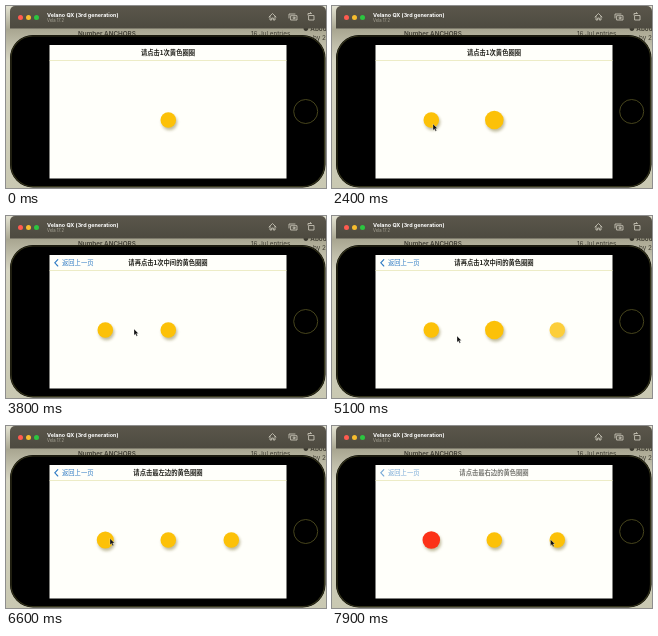
An HTML page for the animation above (8000 ms loop, 320 px wide and 182 px high).

```html
<!DOCTYPE html>
<html lang="zh">
<head>
<meta charset="utf-8">
<title>Tap the dots</title>
<style>
  html, body { margin: 0; width: 100%; height: 100%; overflow: hidden; background: #d0cec2; }
  svg { display: block; width: 100%; height: 100%; }
  text { font-family: "Noto Sans CJK SC", "Noto Sans CJK", "Noto Sans CJK JP", sans-serif; font-size: 6.3px; }
  .ui { font-family: Inter, Roboto, sans-serif; }
  .heading { font-weight: 700; fill: #20201a; text-anchor: middle; }
  .icon { fill: none; stroke: #d2cec0; stroke-width: .8; stroke-linejoin: round; stroke-linecap: round; }
</style>
</head>
<body>
<svg viewBox="0 0 320 182" preserveAspectRatio="none">
  <defs>
    <linearGradient id="bar" x2="0" y2="1">
      <stop stop-color="#5a564b"/><stop offset="1" stop-color="#4d4a40"/>
    </linearGradient>
    <linearGradient id="desk" x2="0" y2="1">
      <stop stop-color="#e4e3d2"/><stop offset=".13" stop-color="#a9a691"/>
      <stop offset=".3" stop-color="#d6d5c2"/><stop offset="1" stop-color="#c9c8b2"/>
    </linearGradient>
    <filter id="blur" x="-60%" y="-60%" width="220%" height="220%"><feGaussianBlur stdDeviation="1.8"/></filter>
  </defs>

  <rect width="320" height="182" fill="url(#desk)"/>
  <g fill="#3c3a30">
    <text class="ui" x="72" y="30" font-weight="600">Number ANCHORS</text>
    <text class="ui" x="245" y="30">16 Jul entries</text>
    <text class="ui" x="297" y="25" font-weight="600">● About</text>
    <text class="ui" x="307" y="34">by 2</text>
  </g>

  <path d="M4 22.5V5a5 5 0 0 1 5-5H315a5 5 0 0 1 5 5V22.5z" fill="url(#bar)"/>
  <circle cx="14.5" cy="11.5" r="2.5" fill="#ff5b50"/>
  <circle cx="22.5" cy="11.5" r="2.5" fill="#f6bd2e"/>
  <circle cx="30.5" cy="11.5" r="2.5" fill="#2cc640"/>
  <text class="ui" x="41" y="10.8" fill="#fff" font-weight="700" style="font-size:5.4px">Velano QX (3rd generation)</text>
  <text class="ui" x="41" y="16.3" fill="#aaa698" style="font-size:4.2px">Vela 17.2</text>
  <path class="icon" d="M263 11l3.5-3.5 3.5 3.5M264 10.3V14h1.7v-2h1.6v2H269v-3.7"/>
  <path class="icon" d="M283 12V8h6M285 9.7h6V14h-6z"/>
  <circle class="icon" cx="288" cy="11.9" r="1"/>
  <path class="icon" d="M303 9.5h5V14h-5zM302 9V7.5h3.5l-1.2-1"/>

  <rect x="4" y="29" width="315.5" height="152.5" rx="23" fill="#000"/>
  <rect x="5" y="30" width="313.5" height="150.5" rx="22" fill="none" stroke="#34331b" stroke-width="1.2"/>
  <circle cx="299.7" cy="105.5" r="12" fill="#000" stroke="#4e4c20" stroke-width=".9"/>
  <rect x="43.5" y="39" width="237" height="133.5" fill="#fffffa"/>
  <path d="M43.5 54.5h237" stroke="#e5e4b0" stroke-width=".7"/>

  <g id="back">
    <path d="M51.8 43.6l-3 3.2 3 3.2" fill="none" stroke="#2f7bc4" stroke-width="1.1" stroke-linecap="round"/>
    <text x="56" y="49" fill="#2f7bc4">返回上一页</text>
  </g>
  <g id="headings"></g>
  <g id="dots"></g>
  <path id="cursor" d="M0 0V6.2L1.5 4.9 2.5 7.2 3.6 6.7 2.6 4.5H4.5z" fill="#111" stroke="#fff" stroke-width=".3"/>
</svg>
<script>
const LOOP = 8000;
const NS = "http://www.w3.org/2000/svg";
const byId = id => document.getElementById(id);

function add(parent, tag, attrs) {
  const node = document.createElementNS(NS, tag);
  for (const key in attrs) node.setAttribute(key, attrs[key]);
  return parent.appendChild(node);
}

const clamp = v => Math.max(0, Math.min(1, v));
const ease = v => v * v * (3 - 2 * v);
const ramp = (t, from, to) => ease(clamp((t - from) / (to - from)));
const mix = (a, b, k) => a + (b - a) * k;

const pages = [
  { text: "请点击1次黄色圈圈", from: -1000 },
  { text: "请再点击1次中间的黄色圈圈", from: 2850 },
  { text: "请点击最左边的黄色圈圈", from: 5550 },
  { text: "请点击最右边的黄色圈圈", from: 7700 }
];
for (const page of pages) {
  page.node = add(byId("headings"), "text", { class: "heading", x: 162, y: 49 });
  page.node.textContent = page.text;
}

const dots = [99.3, 162.3, 225.3].map(x => {
  const group = add(byId("dots"), "g", { transform: `translate(${x} 114)` });
  const shadow = add(group, "circle", { cx: 1.2, cy: 2.4, fill: "#8d8450", opacity: .55, filter: "url(#blur)" });
  const disc = add(group, "circle", {});
  return { group, shadow, disc };
});

// Pointer stops: time, x, y
const stops = [
  [850, 176, 165], [1300, 163, 118], [1800, 163, 118], [2300, 101, 118],
  [3100, 101, 118], [3800, 128, 113], [4150, 163, 116], [4550, 163, 116],
  [5050, 125, 120], [5800, 125, 120], [6350, 104, 112.5], [7150, 104, 112.5],
  [7850, 218.5, 113.5], [8000, 218.5, 113.5]
];

function pointerAt(t) {
  const i = Math.max(1, stops.findIndex(s => s[0] >= t));
  const [a, b] = [stops[i - 1], stops[i]];
  const k = ramp(t, a[0], b[0]);
  return [mix(a[1], b[1], k), mix(a[2], b[2], k)];
}

// Grows on a tap and shrinks when the page has changed
const pressed = (t, tap, release) => ramp(t, tap, tap + 300) - ramp(t, release, release + 300);

function setDot(dot, radius, alpha, red = 0) {
  dot.group.setAttribute("opacity", alpha);
  dot.shadow.setAttribute("r", radius);
  dot.disc.setAttribute("r", radius);
  dot.disc.setAttribute("fill", `rgb(252,${Math.round(mix(193, 50, red))},${Math.round(mix(8, 24, red))})`);
}

function render(t) {
  pages.forEach((page, i) => {
    const next = pages[i + 1];
    const shown = ramp(t, page.from, page.from + 350);
    const gone = next ? ramp(t, next.from, next.from + 200) : 0;
    page.node.setAttribute("opacity", shown * (1 - gone));
  });
  // The back label dips while the last page comes in
  byId("back").setAttribute("opacity", ramp(t, 2850, 3200) * (1 - .35 * ramp(t, 7700, 7850)));

  const [left, middle, right] = dots;
  setDot(left, 7.8 + pressed(t, 6400, 8000), ramp(t, 1800, 2150), ramp(t, 6800, 7150));
  setDot(middle, 7.8 + 1.5 * (pressed(t, 1550, 2850) + pressed(t, 4300, 5550)), 1);
  setDot(right, 7.8, ramp(t, 4750, 5250));

  const [x, y] = pointerAt(t);
  const cursor = byId("cursor");
  cursor.setAttribute("transform", `translate(${x} ${y})`);
  cursor.setAttribute("opacity", t < 850 ? 0 : 1);
}

function tick() {
  render(performance.now() % LOOP);
  requestAnimationFrame(tick);
}
tick();
</script>
</body>
</html>
```
